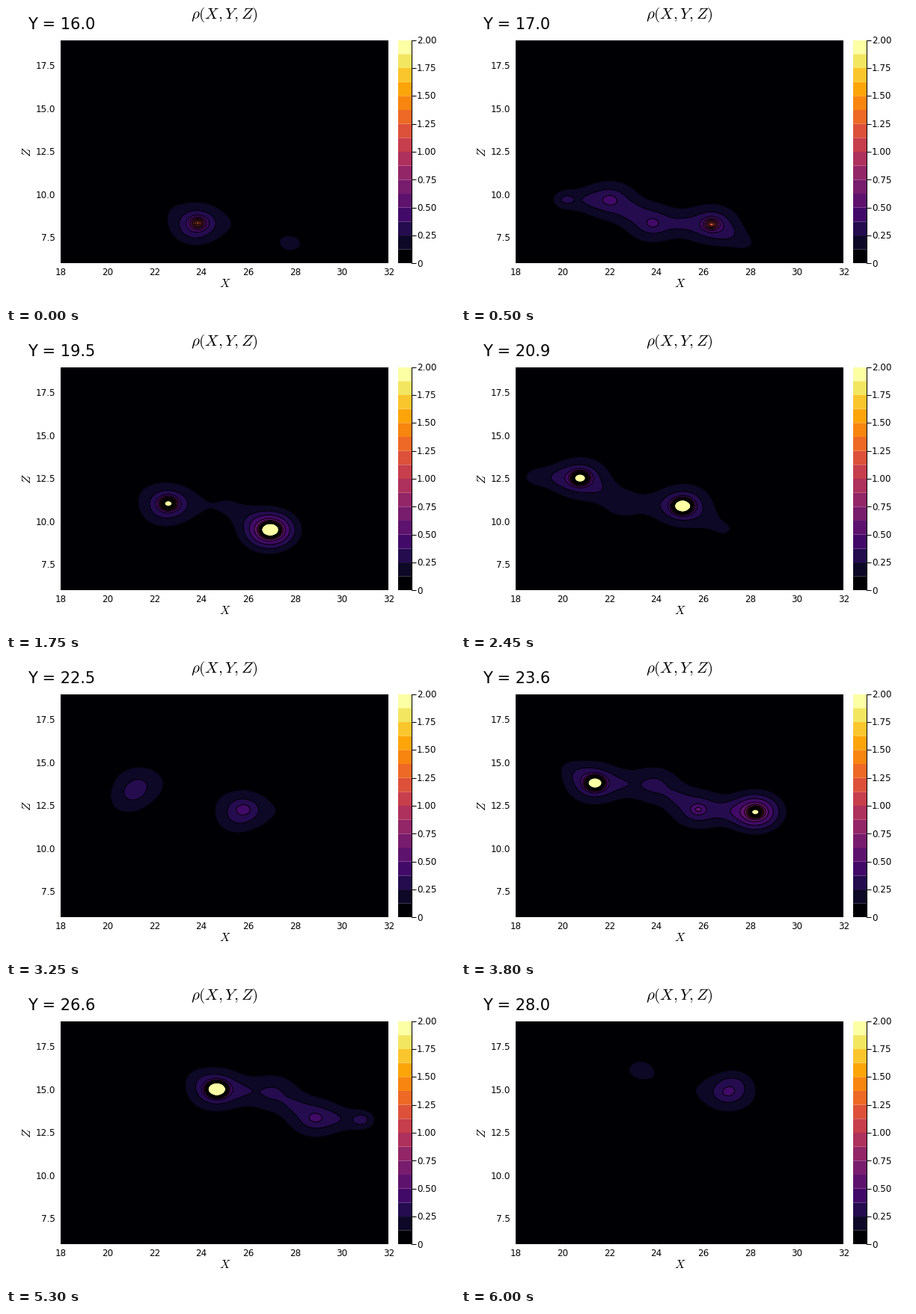
Recreate the animation shown at these times as a matplotlib script. Size 600 by 400 pixels, loop 6.05 s.

```python
import numpy as np
import matplotlib.pyplot as plt
from itertools import combinations
from matplotlib.animation import FuncAnimation

W, H, DPI = 600, 400, 100
FRAMES, INTERVAL = 121, 50
LEFT, RIGHT, TOP, BOTTOM = 73, 511.4, 45.6, 344.4
X0, X1, Z0, Z1 = 18, 32, 6, 19

plt.rcParams["font.family"] = "DejaVu Sans"
plt.rcParams["mathtext.fontset"] = "cm"

# Radial density per element: core * exp(-a r) + val * r^2 * exp(-b r)
KINDS = {
    "C": (116, 11.34, 5.9, 3.45),
    "N": (189, 13.34, 13.7, 3.9),
    "H": (0.47, 2.4, 0.0, 1.0),
}
# Extra charge in the middle of each bond
BOND_MAX, BOND_AMP, BOND_WIDTH = 2.95, 0.08, 0.6

# One half of a flat, mirror-symmetric molecule, in its own plane (u, v)
HALF = [
    ("C", 1.281, 4.0), ("C", 2.66, 1.67), ("C", 1.36, -0.684),
    ("C", 5.31, 1.57), ("C", 6.46, -0.68), ("C", 5.06, -2.98),
    ("N", 2.59, -2.95),
    ("H", 2.32, 5.77), ("H", 6.42, 3.3), ("H", 8.52, -0.74), ("H", 6.07, -4.82),
]
ORIGIN = np.array([24.82, 21.96, 11.83])
U_AXIS = np.array([0.248, 0.85, 0.503])
V_AXIS = np.array([-0.938, 0.08, 0.338])

atoms = [(k, s * u, v) for k, u, v in HALF for s in (-1, 1)]
pos = np.array([ORIGIN + u * U_AXIS + v * V_AXIS for _, u, v in atoms])
core, a, val, b = np.array([KINDS[k] for k, _, _ in atoms]).T[:, :, None, None]
mids = np.array([(p + q) / 2 for p, q in combinations(pos, 2)
                 if np.linalg.norm(p - q) < BOND_MAX])

xs = np.linspace(X0, X1, 141)
zs = np.linspace(Z0, Z1, 131)


def flat_r2(points):
    return ((xs[None, None, :] - points[:, 0, None, None]) ** 2
            + (zs[None, :, None] - points[:, 2, None, None]) ** 2)


atom_r2 = flat_r2(pos)
bond_maps = BOND_AMP * np.exp(-flat_r2(mids) / BOND_WIDTH ** 2)


def density(y):
    r2 = atom_r2 + (y - pos[:, 1, None, None]) ** 2
    r = np.sqrt(r2)
    rho = (core * np.exp(-a * r) + val * r2 * np.exp(-b * r)).sum(axis=0)
    near = np.exp(-((y - mids[:, 1]) / BOND_WIDTH) ** 2)
    return rho + np.tensordot(near, bond_maps, axes=1)


fig = plt.figure(figsize=(W / DPI, H / DPI), dpi=DPI, facecolor="white")


def px_axes(x0, y0, x1, y1):
    return fig.add_axes([x0 / W, 1 - y1 / H, (x1 - x0) / W, (y1 - y0) / H])


def label(x, y, s, size=8.6, **kw):
    kw.setdefault("va", "baseline")
    return fig.text(x / W, 1 - y / H, s, fontsize=size, color="black", **kw)


levels = np.linspace(0, 2, 17)
bands = plt.get_cmap("inferno")(np.linspace(0, 1, 16))
fills = list(bands) + [bands[-1]]

ax = px_axes(LEFT, TOP, RIGHT, BOTTOM)
ax.set(xlim=(X0, X1), ylim=(Z0, Z1), xticks=[], yticks=[], facecolor=bands[0])
ax.spines[:].set_visible(False)

for x in range(18, 33, 2):
    label(LEFT + (x - X0) / (X1 - X0) * (RIGHT - LEFT), 360, str(x), ha="center")
for z in (7.5, 10.0, 12.5, 15.0, 17.5):
    y = BOTTOM - (z - Z0) / (Z1 - Z0) * (BOTTOM - TOP)
    label(66, y + 4.4, f"{z:.1f}", ha="right")

# Colour scale
bar = px_axes(524, TOP, 542, BOTTOM)
bar.barh(levels[:-1], 1, height=0.125, align="edge", color=bands, snap=False)
bar.set(xlim=(0, 1), ylim=(0, 2), xticks=[],
        yticks=np.arange(0, 2.1, 0.25), yticklabels=[])
bar.yaxis.tick_right()
bar.tick_params(axis="y", length=4.2, width=0.75)
for side in ("top", "left", "bottom"):
    bar.spines[side].set_visible(False)
bar.spines["right"].set_linewidth(0.75)
for v in np.arange(0, 2.1, 0.25):
    y = BOTTOM - v / 2 * (BOTTOM - TOP)
    label(549, y + 4.2, f"{v:.2f}" if v else "0")

label(291.5, 17, r"$\rho(X,Y,Z)$", 15, ha="center")
label(292.5, 376.5, "$X$", 11.5, ha="center")
label(28.3, 195, "$Z$", 11.5, ha="center", va="center", rotation=90)
heading = label(29, 31, "", 15)

drawn = []


def update(i):
    while drawn:
        drawn.pop().remove()
    y = 16 + i / 10
    rho = density(y)
    drawn.append(ax.contourf(xs, zs, rho, levels=levels, colors=fills, extend="max"))
    drawn.append(ax.contour(xs, zs, rho, levels=levels[1:], colors="black",
                            linewidths=0.75))
    heading.set_text(f"Y = {y:.1f}")
    return drawn + [heading]


anim = FuncAnimation(fig, update, frames=FRAMES, interval=INTERVAL,
                     init_func=lambda: update(0), repeat=True, blit=False)
plt.show()
```
